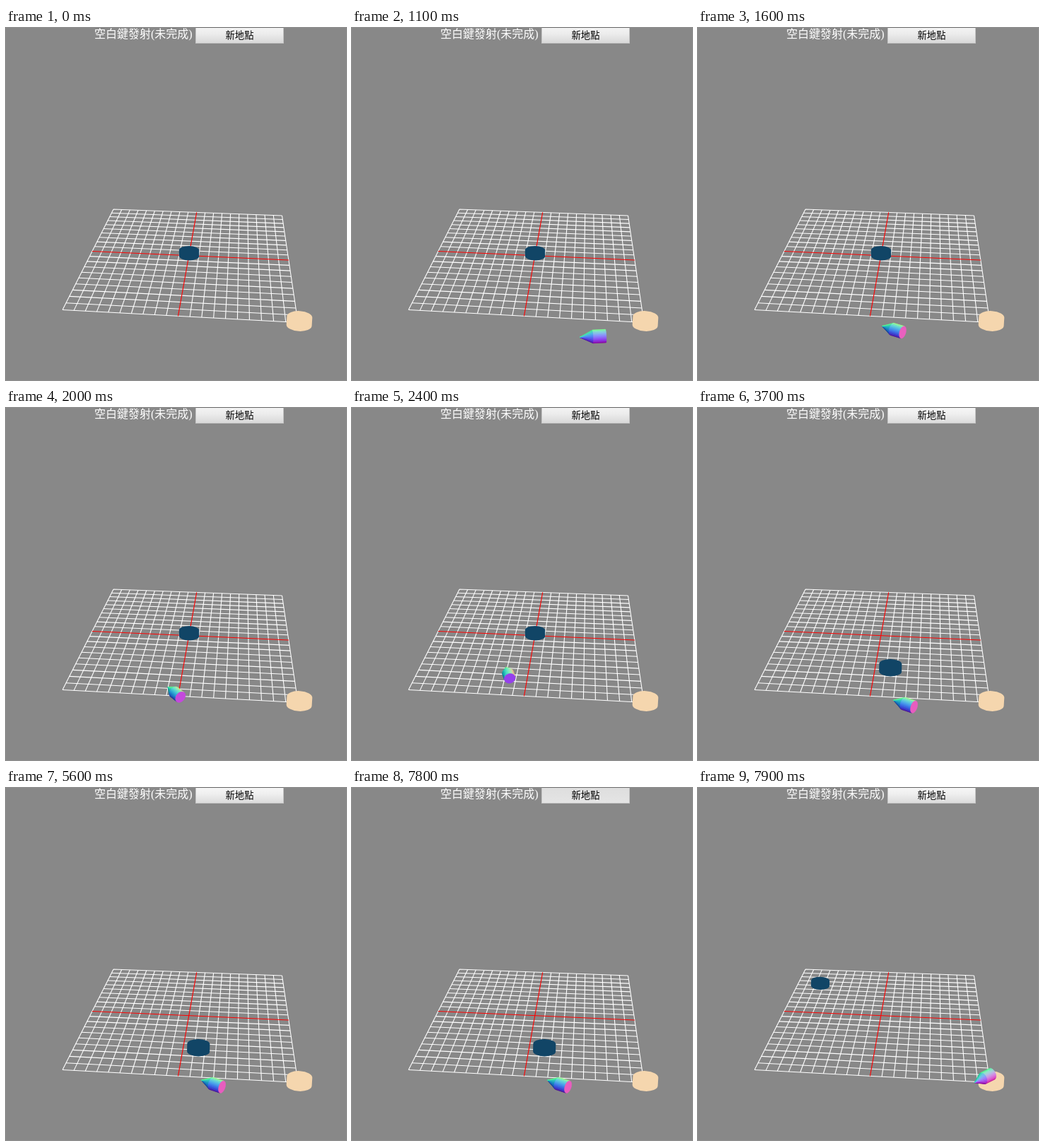
An HTML page with a canvas for the animation above (8000 ms loop, 481 by 499 pixels).

```html
<!DOCTYPE html>
<html lang="zh-Hant">
<head>
<meta charset="utf-8">
<style>
  html, body { margin: 0; width: 100%; height: 100%; overflow: hidden; background: #888; }
  canvas { position: absolute; left: 0; top: 0; }
  .label, .button { position: absolute; white-space: nowrap; }
  .label {
    left: 125px; top: -1px; line-height: 20px; color: #fff;
    font: 300 16px/20px "Liberation Serif", "Noto Sans CJK TC", "Noto Sans CJK SC", "Noto Sans CJK", serif;
  }
  .button {
    left: 268px; top: -1px; width: 125px; height: 23px; box-sizing: border-box;
    border: 1px solid #c4c4c4; text-align: center; color: #000;
    font: 13.33px/20px "Noto Sans CJK TC", "Noto Sans CJK SC", "Noto Sans CJK", sans-serif;
    background: linear-gradient(#f3f3f3, #ececec 40%, #d8d8d8);
  }
  .button.hover { background: linear-gradient(#f6f6f6, #efefef 40%, #dbdbdb); }
  .button.down { background: linear-gradient(#dedede, #e4e4e4); }
</style>
</head>
<body>
<canvas id="stage" width="481" height="499"></canvas>
<div class="label">空白鍵發射(未完成)</div>
<div class="button" id="button">新地點</div>
<script>
const ctx = document.getElementById('stage').getContext('2d');
const button = document.getElementById('button');
const LOOP = 8000, STEP = 100, CELLS = 20, SIDES = 28;

// Flight keys: time, x, y, heading (x right, y up, z to viewer), scale
const flight = [
  [500, 399, 423, -.77, -.38, .52, .93],
  [800, 374, 434, -.92, -.22, .32, .97],
  [1100, 340.5, 437.5, -.99, -.05, .1, 1],
  [1300, 312.5, 436, -.96, .07, -.2, .99],
  [1600, 275, 427, -.83, .25, -.5, .95],
  [1900, 244.5, 409, -.62, .4, -.68, .91],
  [2200, 226, 390, -.36, .48, -.8, .87],
  [2400, 220.5, 375.5, -.17, .5, -.85, .85],
  [2800, 225, 350, .25, .55, -.8, .77],
  [3200, 247, 327.5, .6, .5, -.62, .69],
  [3400, 259, 319, .68, .45, -.57, .65]
];
const parked = [291, 419, -.82, .27, -.5, .96];
const restart = [403.5, 411.5, -.72, -.36, .6, .92];

function slope(i, k) {
  const a = flight[Math.max(i - 1, 0)], b = flight[Math.min(i + 1, flight.length - 1)];
  return (b[k] - a[k]) / (b[0] - a[0]);
}

function flightAt(t) {
  let i = 0;
  while (i < flight.length - 2 && t >= flight[i + 1][0]) i++;
  const a = flight[i], b = flight[i + 1], dt = b[0] - a[0], s = (t - a[0]) / dt;
  const s2 = s * s, s3 = s2 * s;
  return a.slice(1).map((p, j) => {
    const k = j + 1;
    return (2 * s3 - 3 * s2 + 1) * p + (s3 - 2 * s2 + s) * dt * slope(i, k)
      + (3 * s2 - 2 * s3) * b[k] + (s3 - s2) * dt * slope(i, k + 1 > 6 ? 6 : k);
  });
}

const add = (a, b, k) => a.map((v, i) => v + b[i] * k);
const unit = a => { const l = Math.hypot(...a); return a.map(v => v / l); };
const cross = (a, b) => [
  a[1] * b[2] - a[2] * b[1], a[2] * b[0] - a[0] * b[2], a[0] * b[1] - a[1] * b[0]
];
const normalColor = n => `rgb(${n.map(v => Math.round(127.5 + 127.5 * v)).join()})`;

function face(points, normal) {
  if (normal[2] <= 0) return;
  ctx.beginPath();
  points.forEach(p => ctx.lineTo(p[0], -p[1]));
  ctx.closePath();
  ctx.fillStyle = ctx.strokeStyle = normalColor(normal);
  ctx.lineWidth = .4;
  ctx.fill();
  ctx.stroke();
}

function makeRocket([x, y, dx, dy, dz, scale]) {
  const d = unit([dx, dy, dz]), half = 18.5 * scale, r = 9.4 * scale;
  const u = unit(cross(d, [0, 0, 1])), v = cross(d, u);
  const mid = [x, -y, 0], tip = add(mid, d, half), base = add(mid, d, -half);
  const radial = i => {
    const a = i / SIDES * 2 * Math.PI;
    return add(u.map(c => c * Math.cos(a)), v, Math.sin(a));
  };
  const ids = [...Array(SIDES).keys()];
  return {
    cone() {
      for (const i of ids) {
        const n = unit(add(radial(i + .5).map(c => c * half), d, r));
        face([add(mid, radial(i), r), add(mid, radial(i + 1), r), tip], n);
      }
    },
    body() {
      for (const i of ids) {
        const a = radial(i), b = radial(i + 1);
        face([add(mid, a, r), add(mid, b, r), add(base, b, r), add(base, a, r)], radial(i + .5));
      }
      face(ids.map(i => add(base, radial(i), r)), d.map(c => -c));
    }
  };
}

function disc(x, y, rx, ry, h, color, tilt) {
  ctx.save();
  ctx.translate(x, y);
  ctx.rotate(tilt);
  ctx.beginPath();
  ctx.ellipse(0, -h / 2, rx, ry, 0, Math.PI, 2 * Math.PI);
  ctx.ellipse(0, h / 2, rx, ry, 0, 0, Math.PI);
  ctx.closePath();
  ctx.fillStyle = color;
  ctx.fill();
  ctx.restore();
}

// Perspective map of the unit square onto the floor's four corners
function floorMap([x0, y0], [x1, y1], [x2, y2], [x3, y3]) {
  const ax = x1 - x2, bx = x3 - x2, cx = x0 - x1 + x2 - x3;
  const ay = y1 - y2, by = y3 - y2, cy = y0 - y1 + y2 - y3;
  const det = ax * by - bx * ay;
  const g = (cx * by - bx * cy) / det, h = (ax * cy - cx * ay) / det;
  return (u, v) => {
    const w = g * u + h * v + 1;
    return [
      ((x1 - x0 + g * x1) * u + (x3 - x0 + h * x3) * v + x0) / w,
      ((y1 - y0 + g * y1) * u + (y3 - y0 + h * y3) * v + y0) / w
    ];
  };
}
const floor = floorMap([152, 257], [390.5, 266], [413, 417.5], [80, 399.5]);

function gridLine(k, color) {
  ctx.strokeStyle = color;
  ctx.lineWidth = 1.1;
  ctx.beginPath();
  ctx.moveTo(...floor(k, 0));
  ctx.lineTo(...floor(k, 1));
  ctx.moveTo(...floor(0, k));
  ctx.lineTo(...floor(1, k));
  ctx.stroke();
}

function goal(t) {
  const color = '#114566';
  if (t < 3700) disc(259, 319.2, 14.2, 6, 8.4, color, .02);
  else if (t < 7900) disc(272.2, 368.2, 16, 7, 10.4, color, .02);
  else disc(173, 276.8, 13, 5.3, 7.6, color, .02);
}

function buttonState(t) {
  if (t === 3600 || t === 7800) return 'down';
  return (t >= 3500 && t < 4300) || t >= 5600 ? 'hover' : '';
}

function pose(t) {
  if (t < 500 || (t > 3400 && t < 3700)) return null;
  if (t <= 3400) return flightAt(t);
  return t < 7900 ? parked : restart;
}

function draw(t) {
  ctx.fillStyle = '#888';
  ctx.fillRect(0, 0, 481, 499);
  for (let i = 0; i <= CELLS; i++) if (i !== CELLS / 2) gridLine(i / CELLS, '#fff');
  gridLine(.5, '#f00');
  disc(415, 415.5, 18, 8.6, 11.6, '#f5d6ae', .06);

  const p = pose(t), rocket = p && makeRocket(p);
  if (rocket) rocket.cone();
  const inside = t > 3200 && t <= 3400;
  if (rocket && inside) rocket.body();
  goal(t);
  if (rocket && !inside) rocket.body();
  button.className = 'button ' + buttonState(t);
}

const start = performance.now();
function tick() {
  const t = (performance.now() - start) % LOOP;
  draw(Math.floor(t / STEP) * STEP);
  requestAnimationFrame(tick);
}
tick();
</script>
</body>
</html>
```
